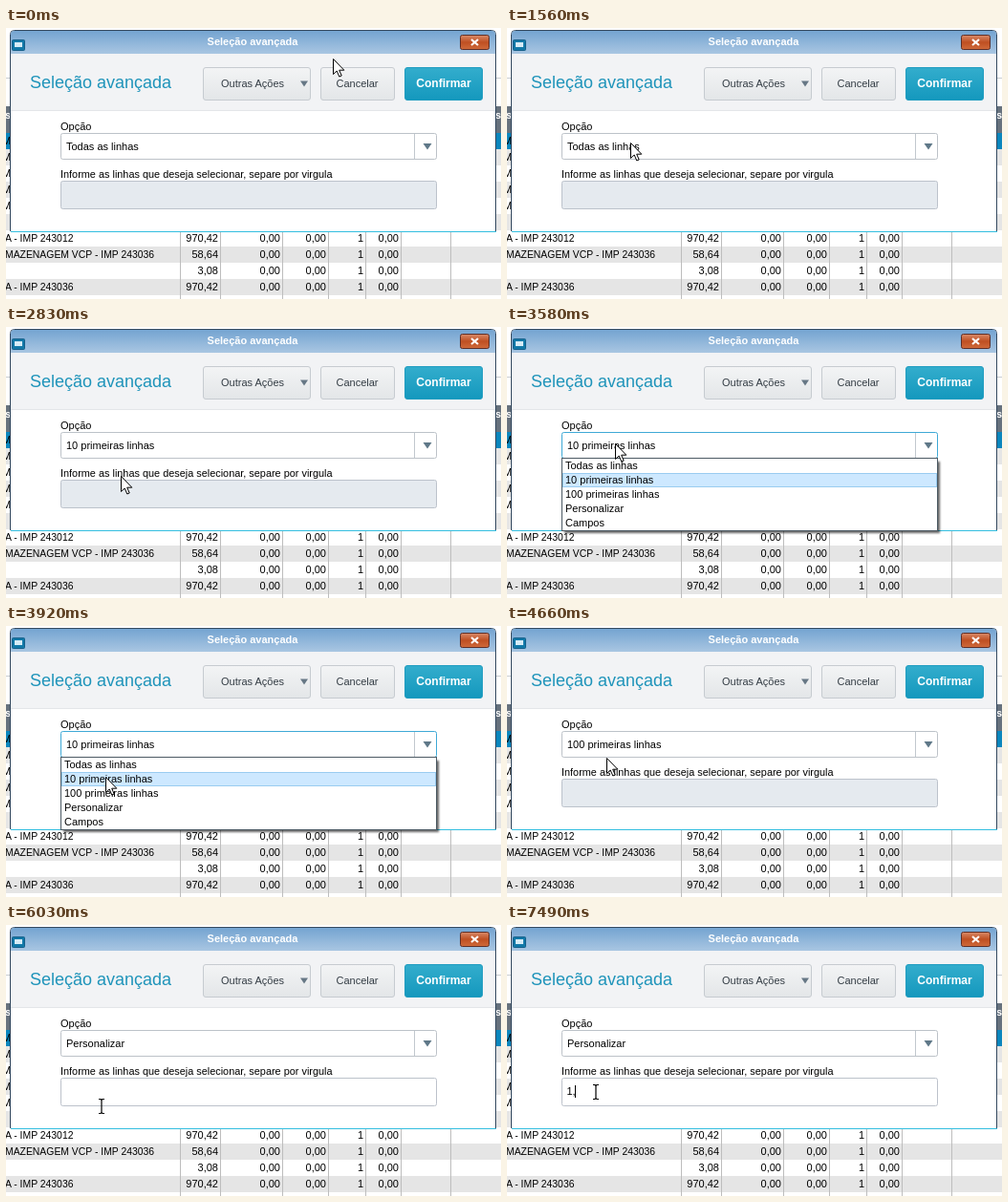
An HTML page for the animation above (8 s loop, 518 by 284 pixels).

```html
<!DOCTYPE html>
<html lang="pt">
<head>
<meta charset="utf-8">
<style>
html, body { margin: 0; width: 100%; height: 100%; overflow: hidden; background: #fff; }
svg { display: block; width: 518px; height: 284px; font: 11px "Liberation Sans", Arial, sans-serif; white-space: pre; }
</style>
</head>
<body>
<svg viewBox="0 0 518 284">
  <defs>
    <linearGradient id="bar" x2="0" y2="1"><stop stop-color="#74a4d1"/><stop offset="1" stop-color="#a9c6e2"/></linearGradient>
    <linearGradient id="gray" x2="0" y2="1"><stop stop-color="#f3f4f5"/><stop offset="1" stop-color="#e3e6e8"/></linearGradient>
    <linearGradient id="teal" x2="0" y2="1"><stop stop-color="#33adcd"/><stop offset="1" stop-color="#1498bd"/></linearGradient>
    <linearGradient id="red" x2="0" y2="1"><stop stop-color="#d98a68"/><stop offset=".5" stop-color="#bf4f22"/><stop offset="1" stop-color="#cf6a3a"/></linearGradient>
    <filter id="blur"><feGaussianBlur stdDeviation=".9"/></filter>
  </defs>
  <g id="page"></g>

  <path d="M4.5 213V6.5Q4.5 2.5 8.5 2.5H508.5Q512.5 2.5 512.5 6.5V213" fill="#fff" stroke="#34495f"/>
  <path d="M5 27V6.5Q5 3 8.5 3H508.5Q512 3 512 6.5V27Z" fill="url(#bar)"/>
  <path d="M5 213.5H513" stroke="#35bfe0"/>
  <rect x="5" y="27" width="507" height="59" fill="#f2f3f5"/>
  <path d="M5 86.5H512" stroke="#e3e6e9"/>
  <rect x="6.5" y="12.5" width="13" height="11" rx="1" fill="#1279a8" stroke="#17608a"/>
  <path d="M9 15H17V20H9Z" fill="#d6ecf7"/>
  <text x="258" y="18" text-anchor="middle" font-weight="bold" fill="#fff">Seleção avançada</text>
  <rect x="475.5" y="7.5" width="30" height="15" rx="2" fill="url(#red)" stroke="#5e2f28"/>
  <path d="M487 12L494 18M494 12L487 18" stroke="#fff" stroke-width="2.2"/>
  <text x="25" y="63" font-size="18" fill="#1f94ba">Seleção avançada</text>

  <g stroke="#c6cbd0" fill="url(#gray)">
    <rect x="206.5" y="41.5" width="112" height="34" rx="2.5"/>
    <rect x="329.5" y="41.5" width="77" height="34" rx="2.5"/>
    <rect x="417.5" y="41.5" width="81" height="34" rx="2.5" fill="url(#teal)" stroke="#1f9cc0"/>
  </g>
  <g fill="#333c44">
    <text x="225" y="62">Outras Ações</text>
    <text x="345.5" y="62">Cancelar</text>
  </g>
  <text x="458" y="62" text-anchor="middle" font-size="12" font-weight="bold" fill="#fff">Confirmar</text>
  <path d="M308 55.5H316L312 61.5Z" fill="#667785"/>

  <text x="57" y="107">Opção</text>
  <rect id="field" x="57.5" y="110.5" width="393" height="27" rx="2" fill="#fff"/>
  <path d="M427.5 111V137" stroke="#c2c8ce"/>
  <path d="M436.5 121H445.5L441 127.5Z" fill="#5f7888"/>
  <text id="choice" x="63" y="128"></text>
  <text x="57" y="157" font-size="10.9">Informe as linhas que deseja selecionar, separe por virgula</text>
  <rect id="input" x="57.5" y="160.5" width="393" height="29" rx="2" stroke="#bcc2cb"/>
  <text id="typed" x="62.5" y="178"></text>
  <path id="caret" d="M.5 168V181" stroke="#000"/>

  <g id="list">
    <rect x="60" y="141" width="393" height="75" opacity=".6" filter="url(#blur)"/>
    <rect x="57.5" y="137.5" width="393" height="76" fill="#fff" stroke="#4c5a64"/>
    <rect id="hover" x="58.5" width="391" height="14" fill="#cde8ff" stroke="#9accf0"/>
  </g>
  <path id="arrow" d="M.5 .5V16.5L4.2 13 6.8 19 9.2 18 6.7 12.2H11.8Z" fill="#fff" stroke="#000"/>
  <path id="beam" d="M-3 -7.5H-1L0 -6.5 1 -7.5H3M0 -6.5V6.5M-3 7.5H-1L0 6.5 1 7.5H3" fill="none" stroke="#000" stroke-width="1.2"/>
</svg>
<script>
const el = id => document.getElementById(id);
const set = (id, attrs) => { for (const k in attrs) el(id).setAttribute(k, attrs[k]); };
const show = (id, on) => { el(id).style.display = on ? '' : 'none'; };
const rect = (x, y, w, h, fill) => `<rect x="${x}" y="${y}" width="${w}" height="${h}" fill="${fill}"/>`;
const text = (x, y, s, more = '') => `<text x="${x}" y="${y}" ${more}>${s}</text>`;

// Table behind the dialog: striped rows, columns given by their right edge
const ROW = 17, TOP = 127;
const rows = [['A - IMP 243012', '970,42'], ['MAZENAGEM VCP - IMP 243036', '58,64'],
  ['', '3,08'], ['A - IMP 243036', '970,42']];
const columns = [180, 222, 287, 335, 374, 411, 463];
let page = rect(0, 52, 518, 1, '#c9cdd1') + rect(0, 82, 518, 28, '#66717d') + rect(0, 110, 518, ROW, '#0b86bd');
for (let i = 0; TOP + ROW * i < 284; i++) {
  page += rect(0, TOP + ROW * i, 518, ROW, i % 2 ? '#fff' : '#e5e5e5');
  if (i < 5) page += text(-4, TOP - 5 + ROW * i, 'M');
}
for (const x of [-1, 512]) page += text(x, 95, 's', 'fill="#fff" font-weight="bold"');
for (const x of columns) page += rect(x + 2, 213, 1, 71, '#bdbdbd');
rows.forEach(([name, price], i) => {
  const y = 224 + ROW * i;
  page += text(-1, y, name, 'font-size="10.4"');
  [price, '0,00', '0,00', '1', '0,00'].forEach((s, c) => page += text(columns[c + 1], y, s, 'text-anchor="end"'));
});
el('page').innerHTML = page;

const options = ['Todas as linhas', '10 primeiras linhas', '100 primeiras linhas', 'Personalizar', 'Campos'];
el('list').insertAdjacentHTML('beforeend', options.map((s, i) => text(61, 149 + 15 * i, s)).join(''));

// Pointer moves: start time and destination; each one takes MOVE ms
const MOVE = 320;
const moves = [[460, 305, 13], [780, 78, 86], [1100, 129, 120], [2130, 120, 156], [3180, 113, 122], [3600, 104, 158],
  [4050, 105, 174], [4520, 104, 122], [5090, 103, 146], [5480, 100, 190], [6170, 93, 175]];

function pointer(t) {
  let x = 342, y = 32;
  for (const [start, toX, toY] of moves) {
    const left = 1 - Math.min(1, Math.max(0, (t - start) / MOVE));
    const k = 1 - left * left;
    x += (toX - x) * k;
    y += (toY - y) * k;
  }
  return [Math.round(x), Math.round(y)];
}

// The list opens three times; each closing picks the next option
const visits = [[1690, 2500], [3540, 4520], [4940, 5800]];

function draw(t) {
  const [x, y] = pointer(t);
  const open = visits.some(([from, to]) => t >= from && t < to);
  const pick = visits.filter(([, to]) => t >= to).length;
  const editable = pick === 3;
  const row = y < 138 ? pick : Math.min(4, Math.floor((y - 138) / 15));
  const typed = t < 6960 ? '' : t < 7490 ? '1' : '1,';

  el('choice').textContent = options[pick];
  el('typed').textContent = typed;
  set('field', { stroke: open ? '#3fa9d6' : '#bcc2c8' });
  set('input', { fill: editable ? '#fff' : '#e5eaef' });
  set('hover', { y: 138.5 + 15 * row });
  set('caret', { transform: `translate(${Math.round(62 + el('typed').getComputedTextLength())})` });
  show('caret', t >= 6560 && (t < 7220 || t >= 7490));
  show('list', open);
  show('arrow', !editable);
  show('beam', editable);
  set(editable ? 'beam' : 'arrow', { transform: `translate(${x} ${y})` });
}

const start = performance.now();
function tick() {
  draw((performance.now() - start) % 8000);
  requestAnimationFrame(tick);
}
tick();
</script>
</body>
</html>
```
